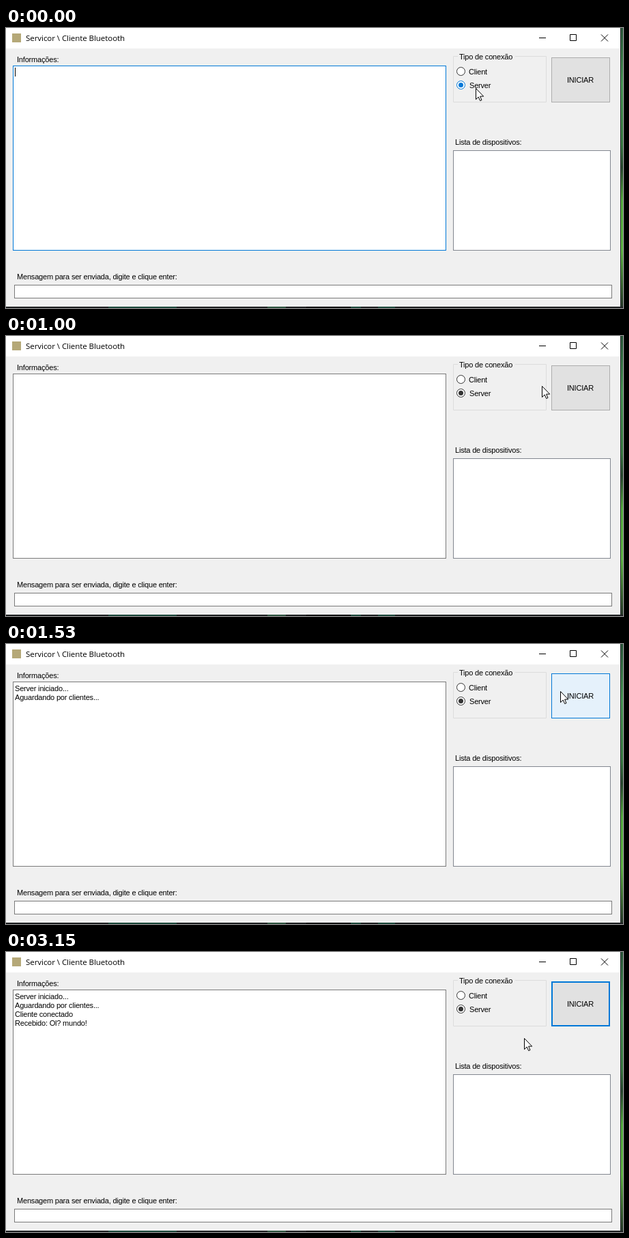
Recreate the animation shown at these times as an HTML page. Size 904x410 px, loop 4.23 s.

```html
<!DOCTYPE html>
<html lang="pt">
<head>
<meta charset="utf-8">
<title>Bluetooth</title>
<style>
html, body { margin: 0; width: 100%; height: 100%; overflow: hidden; background: #f0f0f0; }
svg { display: block; width: 904px; height: 410px; }
text { font: 11px "Liberation Sans", Arial, sans-serif; letter-spacing: -.19px; fill: #000; white-space: pre; }
.title { font: 11.5px "Open Sans", "Noto Sans", sans-serif; letter-spacing: -.05px; }
</style>
</head>
<body>
<svg viewBox="0 0 904 410">
  <defs>
    <linearGradient id="side" x2="0" y2="1">
      <stop offset="0" stop-color="#2f5a3e"/>
      <stop offset=".2" stop-color="#4a9a58"/>
      <stop offset=".42" stop-color="#3c7d45"/>
      <stop offset=".5" stop-color="#2c4a33"/>
      <stop offset=".62" stop-color="#58b043"/>
      <stop offset=".8" stop-color="#62b848"/>
      <stop offset="1" stop-color="#2a3a2c"/>
    </linearGradient>
  </defs>

  <!-- desktop behind the window -->
  <rect width="904" height="410" fill="#1f2123"/>
  <rect x="901" width="3" height="408" fill="url(#side)"/>
  <g fill="#1d4a3c">
    <rect x="150" y="408" width="100" height="2"/>
    <rect x="383" y="408" width="27" height="2" fill="#2f5540"/>
    <rect x="505" y="408" width="15" height="2"/>
    <rect x="545" y="408" width="25" height="2"/>
  </g>
  <rect x="440" y="408" width="65" height="2" fill="#08060a"/>

  <!-- window -->
  <rect width="900" height="408" fill="#f0f0f0"/>
  <rect width="900" height="30" fill="#fff"/>
  <rect x="9" y="8" width="13" height="13" fill="#b5a878"/>
  <text class="title" x="29" y="19">Servicor \ Cliente Bluetooth</text>
  <g fill="none" stroke="#000">
    <path d="M781 14.5h10M826.5 9.5h9v9h-9z"/>
    <path d="M872 9.5l10 10M882 9.5l-10 10"/>
  </g>

  <text x="16" y="50">Informações:</text>
  <rect id="box" x="10.5" y="55.5" width="634" height="270" fill="#fff"/>
  <path id="caret" d="M13.5 58v13" stroke="#000"/>
  <g id="log"></g>

  <path d="M662 41.5h-6.5v67h136v-67H746" fill="none" stroke="#dcdcdc"/>
  <text x="664" y="46">Tipo de conexão</text>
  <circle cx="666.5" cy="63.5" r="6" fill="#fff" stroke="#333"/>
  <text x="678" y="68">Client</text>
  <circle id="ring" cx="666.5" cy="83.5" r="6"/>
  <circle id="dot" cx="666.5" cy="83.5" r="3.5"/>
  <text x="679" y="88">Server</text>

  <rect id="btn" x="799.5" y="43.5" width="85" height="65"/>
  <rect id="focus" x="800.5" y="44.5" width="83" height="63" fill="none" stroke="#0078d7"/>
  <text x="822" y="80">INICIAR</text>

  <text x="658" y="171">Lista de dispositivos:</text>
  <rect x="655.5" y="179.5" width="230" height="146" fill="#fff" stroke="#828790"/>
  <text x="16" y="368">Mensagem para ser enviada, digite e clique enter:</text>
  <rect x="12.5" y="376.5" width="875" height="19" fill="#fff" stroke="#7a7a7a"/>

  <path id="cursor" d="M.5.5V16.6L4.2 13l2.5 5.5 2.3-1L6.6 12.1h5.1z" fill="#fff" stroke="#000"/>
</svg>
<script>
const LOOP = 4230;
const $ = id => document.getElementById(id);
const set = (id, attrs) => {
  for (const k in attrs) $(id).setAttribute(k, attrs[k]);
};

// Each track holds a value from its time until the next entry.
const at = (track, t) => track.findLast(k => k[0] <= t).slice(1);

const pointer = [
  [0, 688, 88],
  [840, 698, 86], [920, 745, 78], [1000, 785, 73], [1070, 799, 72],
  [1150, 800, 71], [1230, 806, 70], [1300, 812, 69],
  [1780, 803, 80], [1860, 793, 92], [1930, 785, 100], [2010, 774, 111],
  [2090, 766, 119], [2160, 761, 124], [2240, 759, 126]
];
// fill, border, inner focus opacity
const button = [
  [0, '#e1e1e1', '#adadad', 0],
  [1070, '#e3e9ee', '#5793c2', 0],
  [1150, '#e5f1fb', '#0078d7', 0],
  [1380, '#cce4f7', '#005499', 0],
  [1460, '#d8eaf9', '#0066b8', 0],
  [1530, '#e5f1fb', '#0078d7', 0],
  [1860, '#e3e9ee', '#0078d7', .5],
  [1930, '#e1e1e1', '#0078d7', 1]
];
// fill, ring, dot
const radio = [
  [0, '#fff', '#0078d7', '#0078d7'],
  [290, '#cce4f7', '#005499', '#005499'],
  [440, '#e6f2fb', '#0066b8', '#0066b8'],
  [520, '#fff', '#0078d7', '#0078d7'],
  [920, '#fff', '#1a5685', '#1a5685'],
  [1000, '#fff', '#333', '#333']
];
const border = [
  [0, '#0078d7'], [290, '#1f78c0'], [370, '#3d79a9'], [440, '#5c7a91'], [520, '#7a7a7a']
];
const lines = [
  [1460, 'Server iniciado...'],
  [1460, 'Aguardando por clientes...'],
  [2470, 'Cliente conectado'],
  [3150, 'Recebido: Ol? mundo!']
];

const rows = lines.map(([, s], i) => {
  const row = document.createElementNS('http://www.w3.org/2000/svg', 'text');
  row.setAttribute('x', 13);
  row.setAttribute('y', 69 + 13 * i);
  row.textContent = s;
  return $('log').appendChild(row);
});
const show = (el, on) => el.setAttribute('visibility', on ? 'visible' : 'hidden');

function draw(t) {
  const [x, y] = at(pointer, t);
  set('cursor', { transform: `translate(${x} ${y})` });

  const [face, edge, focus] = at(button, t);
  set('btn', { fill: face, stroke: edge });
  set('focus', { opacity: focus });

  const [fill, ring, dot] = at(radio, t);
  set('ring', { fill, stroke: ring });
  set('dot', { fill: dot });

  set('box', { stroke: at(border, t)[0] });
  show($('caret'), t < 290);
  rows.forEach((row, i) => show(row, t >= lines[i][0]));
}

const start = performance.now();
function tick() {
  draw((performance.now() - start) % LOOP);
  requestAnimationFrame(tick);
}
draw(0);
requestAnimationFrame(tick);
</script>
</body>
</html>
```
